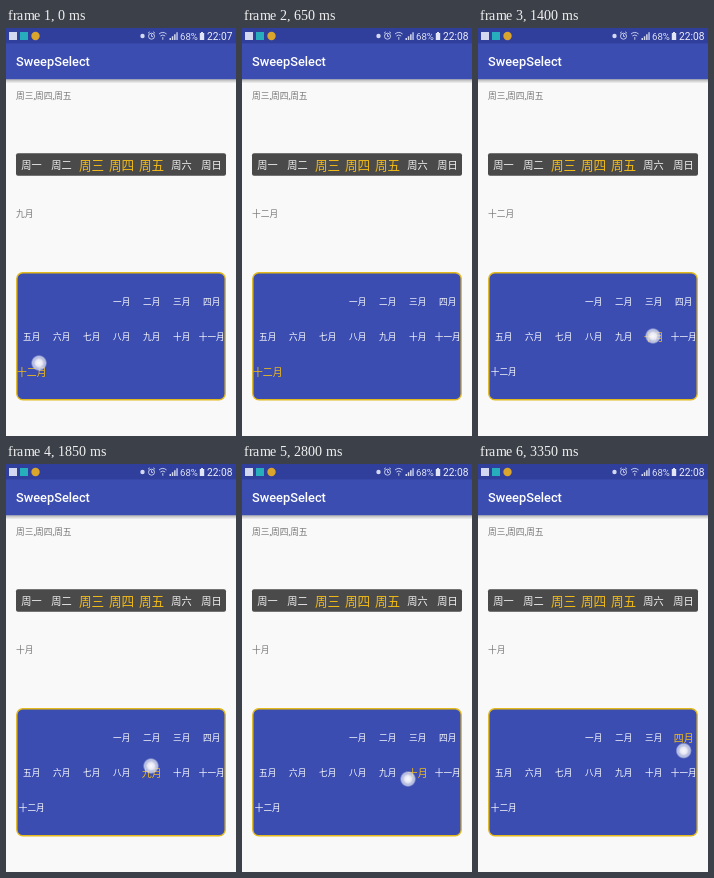
Animation of 230 by 408 pixels, one loop 3400 ms. Source, as an HTML page:

```html
<!DOCTYPE html>
<html lang="zh-CN">
<head>
<meta charset="utf-8">
<title>SweepSelect</title>
<style>
html, body { margin: 0; width: 100%; height: 100%; overflow: hidden; background: #f9f9f9; }
svg { display: block; width: 100vw; height: 100vh; }
text { font-family: Roboto, "Noto Sans CJK SC", "Noto Sans CJK", sans-serif; }
</style>
</head>
<body>
<svg id="stage" viewBox="0 0 230 408">
  <defs>
    <linearGradient id="shade" x1="0" y1="0" x2="0" y2="1">
      <stop offset="0" stop-color="#000" stop-opacity=".3"/>
      <stop offset="1" stop-color="#000" stop-opacity="0"/>
    </linearGradient>
    <radialGradient id="glow">
      <stop offset="0" stop-color="#fff" stop-opacity=".97"/>
      <stop offset=".4" stop-color="#f4f4fa" stop-opacity=".93"/>
      <stop offset=".62" stop-color="#d5d8ea" stop-opacity=".85"/>
      <stop offset=".8" stop-color="#d5d9ef" stop-opacity=".78"/>
      <stop offset="1" stop-color="#c5cbea" stop-opacity="0"/>
    </radialGradient>
  </defs>
  <rect width="230" height="408" fill="#f9f9f9"/>
  <rect y="51" width="230" height="4.5" fill="url(#shade)"/>
  <rect width="230" height="51.2" fill="#3b4db1"/>
  <rect width="230" height="15.4" fill="#303f9c"/>

  <!-- status bar -->
  <rect x="3" y="4" width="8" height="8" fill="#d3d8f0"/>
  <rect x="14" y="4" width="8" height="8" fill="#27aebd"/>
  <circle cx="29.5" cy="8" r="4.2" fill="#d9a52c"/>
  <circle cx="136.5" cy="8" r="2.2" fill="#d3d8f0"/>
  <g fill="none" stroke="#d3d8f0" stroke-width=".9">
    <circle cx="145.5" cy="8.2" r="3"/>
    <path d="M145.5 6.3V8.4H147M142 5.2L143.8 3.8M149 5.2L147.2 3.8"/>
    <path d="M153 6Q156.8 2.8 160.6 6M154.4 8Q156.8 6 159.2 8"/>
    <path d="M156.8 9V11.8"/>
  </g>
  <path d="M163.5 12V10H165V12ZM165.8 12V8.3H167.3V12ZM168.1 12V6.3H169.6V12ZM170.4 12V4.2H171.7V12Z" fill="#d3d8f0"/>
  <path d="M193.8 5H195V4H197V5H198.2V12H193.8Z" fill="#e2e5f5"/>
  <text x="174" y="11.6" font-size="9.6" fill="#dfe3f5">68%</text>
  <text id="clock" x="201" y="11.7" font-size="10.2" fill="#eceefa"></text>

  <text x="10" y="38" font-size="12.8" font-weight="500" fill="#fff">SweepSelect</text>
  <text x="10" y="71.2" font-size="8.7" fill="#777">周三,周四,周五</text>
  <text id="label" x="10" y="189.2" font-size="8.7" fill="#777"></text>

  <rect x="10" y="125.2" width="210" height="22.6" rx="2" fill="#4a4a4a"/>
  <rect x="10.8" y="244.8" width="208.4" height="127" rx="6" fill="#3b4db1" stroke="#e3b91c" stroke-width="1.4"/>
  <g id="cells"></g>
  <circle id="touch" r="8.2" fill="url(#glow)"/>
</svg>
<script>
const LOOP = 3400, STEP = 50, COLS = 7, OFFSET = 3;
const GOLD = "#f5bd16";
const $ = id => document.getElementById(id);
const days = [..."一二三四五六日"].map(c => "周" + c);
const months = [..."一二三四五六七八九十", "十一", "十二"].map(c => c + "月");

// Each stroke is one press of the finger: [time, x, y]
const strokes = [
  [[0, 33, 335], [400, 101, 345], [600, 126, 345]],
  [[900, 150, 274], [1000, 150, 274], [1300, 174, 306], [1400, 175, 308]],
  [[1650, 118, 308], [1850, 145, 302], [2050, 151, 277], [2300, 174, 271],
   [2550, 181, 298], [2800, 166, 315], [3050, 186, 309], [3400, 209, 283]]
];

function addText(str, x, y) {
  const el = document.createElementNS("http://www.w3.org/2000/svg", "text");
  el.textContent = str;
  el.setAttribute("x", x);
  el.setAttribute("text-anchor", "middle");
  el.cy = y;
  $("cells").append(el);
  return el;
}

function style(el, size, fill) {
  el.setAttribute("font-size", size);
  el.setAttribute("y", el.cy + size * 0.37);
  el.setAttribute("fill", fill);
}

days.forEach((d, i) => {
  const on = i > 1 && i < 5;
  style(addText(d, 25.5 + 30 * i, 137), on ? 12.6 : 10.2, on ? GOLD : "#f4f4f4");
});

const cells = months.map((m, i) => {
  const n = i + OFFSET;
  return addText(m, 25.7 + 30 * (n % COLS), 274 + 35 * Math.floor(n / COLS));
});

function fingerAt(t) {
  const s = strokes.find(p => t >= p[0][0] && t <= p[p.length - 1][0]);
  if (!s) return null;
  const i = Math.max(1, s.findIndex(p => p[0] >= t));
  const [a, b] = [s[i - 1], s[i]];
  const k = (t - a[0]) / (b[0] - a[0]);
  return [a[1] + (b[1] - a[1]) * k, a[2] + (b[2] - a[2]) * k];
}

// The last month swept over stays chosen
function chosenAt(t) {
  let chosen = 11;
  for (let u = 1000; u <= t; u += STEP) {
    const p = fingerAt(u);
    if (!p) continue;
    const col = Math.floor((p[0] - 11) / 30), row = Math.floor((p[1] - 256.5) / 35);
    const i = row * COLS + col - OFFSET;
    if (months[i]) chosen = i;
  }
  return chosen;
}

function draw(now) {
  const t = Math.floor(now % LOOP / STEP) * STEP;
  const p = fingerAt(t), chosen = chosenAt(t);
  cells.forEach((el, i) => style(el, i === chosen ? 9.9 : 8.6, i === chosen ? GOLD : "#fff"));
  $("clock").textContent = t < 650 ? "22:07" : "22:08";
  $("label").textContent = months[t < 650 ? 8 : t < 1450 ? 11 : 9];
  $("touch").setAttribute("visibility", p ? "visible" : "hidden");
  if (p) $("touch").setAttribute("transform", `translate(${p})`);
}

const start = performance.now();
function tick() {
  draw(performance.now() - start);
  requestAnimationFrame(tick);
}
tick();
</script>
</body>
</html>
```
